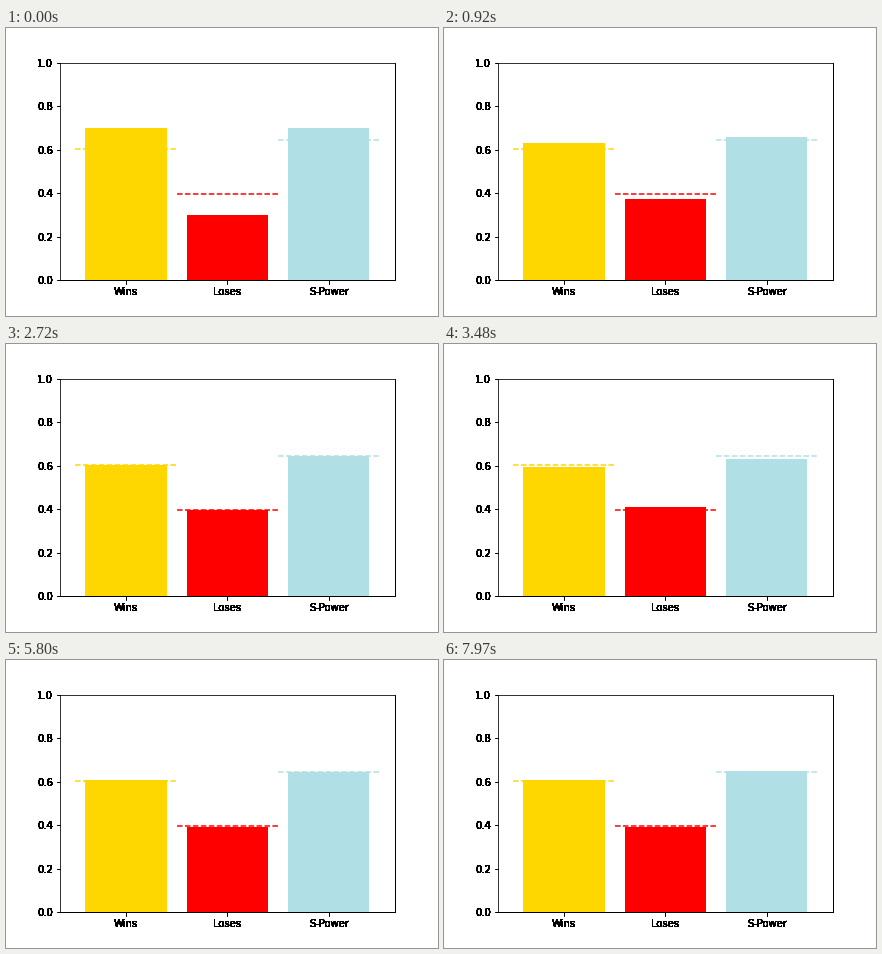
A matplotlib script for the animation above (8 s loop, 432 by 288 pixels).

```python
import numpy as np
import matplotlib.pyplot as plt
from matplotlib.animation import FuncAnimation

FRAMES, STEP = 200, 40
COLORS = ["gold", "red", "powderblue"]
NAMES = ["Wins", "Loses", "S-Power"]
EXPECTED = [0.6025, 0.3975, 0.644]

# Turning points of the two running estimates
KEY_MS = np.array([0, 920, 1600, 2720, 3400, 4280, 4760, 5800, 7960])
KEY_WIN = [0.700, 0.629, 0.6155, 0.604, 0.592, 0.6012, 0.6072, 0.6075, 0.6072]
KEY_POWER = [0.700, 0.6585, 0.649, 0.644, 0.630, 0.6395, 0.648, 0.644, 0.648]


def running_mean(keys, rng):
    """Join the key values with a random walk whose steps shrink like 1/n."""
    n = np.arange(FRAMES)
    key_n = KEY_MS // STEP
    walk = np.cumsum(rng.normal(0, 0.05, FRAMES) / (n + 10))
    return walk + np.interp(n, key_n, keys - walk[key_n])


def repeat_draw(artist, times):
    """Draw an artist several times so its soft edges build up."""
    draw = artist.draw

    def draw_many(renderer):
        for _ in range(times):
            draw(renderer)

    artist.draw = draw_many


rng = np.random.default_rng(7)
win = running_mean(KEY_WIN, rng)
power = running_mean(KEY_POWER, rng)
heights = np.column_stack([win, 1 - win, power])

fig = plt.figure(figsize=(6, 4), dpi=72, facecolor="white")
ax = fig.add_axes([0.125, 0.125, 0.775, 0.755])

for x, (level, color) in enumerate(zip(EXPECTED, COLORS)):
    ax.hlines(level, x - 0.5, x + 0.5, colors=color, linestyles="dashed",
              linewidth=1.5, zorder=0.5)
bars = ax.bar(range(3), heights[0], width=0.8, color=COLORS)

ax.set_xlim(-0.65, 2.65)
ax.set_ylim(0, 1)
ax.set_xticks(range(3), NAMES)
ax.set_yticks(np.linspace(0, 1, 6))

for axis in (ax.xaxis, ax.yaxis):
    for tick in axis.get_major_ticks():
        repeat_draw(tick.tick1line, 4)
        repeat_draw(tick.label1, 30)
for side in ("right", "bottom"):
    repeat_draw(ax.spines[side], 4)


def update(frame):
    for bar, height in zip(bars, heights[frame]):
        bar.set_height(height)
    return list(bars)


anim = FuncAnimation(fig, update, frames=FRAMES, interval=STEP,
                     repeat=True, repeat_delay=0, blit=False)
plt.show()
```
